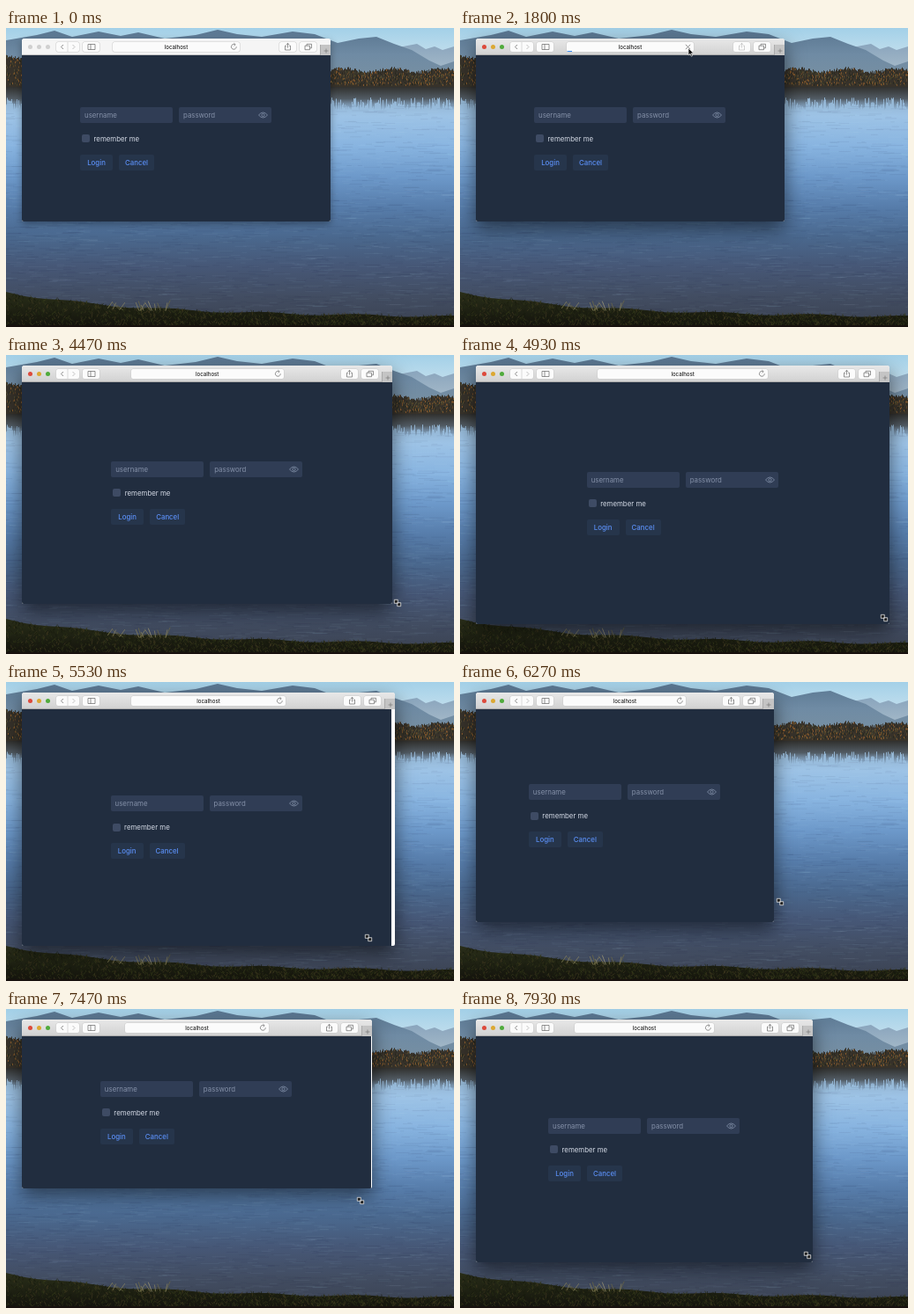
These frames come from a looping animation (508x340 px, 8000 ms). An HTML page with a canvas:

```html
<!DOCTYPE html>
<html lang="en">
<head>
<meta charset="utf-8">
<title>Resizing a login window</title>
<style>
  html, body { margin: 0; width: 508px; height: 340px; overflow: hidden; }
  body { position: relative; font: 7.85px/18px Inter, sans-serif; }
  canvas, svg, #win, #win div { position: absolute; box-sizing: border-box; }
  svg { overflow: visible; fill: none; stroke: #666; stroke-width: .7; }
  #win { left: 18px; top: 12px; border-radius: 3px 3px 2px 2px; overflow: hidden; background: #fff;
         box-shadow: 0 3px 9px rgba(0,0,0,.35); }
  #win.active { box-shadow: 0 8px 22px rgba(0,0,0,.55); }
  #bar { left: 0; right: 0; top: 0; height: 19px; background: #f5f5f5; border-bottom: 1px solid #c4c4c4; }
  .active #bar { background: linear-gradient(#e8e8e8, #d2d2d2); border-color: #aaa; }
  .light { top: 6.7px; width: 5.6px; height: 5.6px; border-radius: 50%; background: #d0d0d0; }
  .active .red { background: #dd4a3c; }
  .active .yellow { background: #dca833; }
  .active .green { background: #50ab3c; }
  .btn { top: 4px; height: 11px; border-radius: 2px; background: #fbfbfb; box-shadow: 0 0 0 .5px #ccc; }
  #address { left: 29.4%; width: 41.2%; overflow: hidden; text-align: center; color: #222;
             font-size: 6.1px; font-weight: 500; line-height: 11.5px; }
  #progress { left: 0; bottom: 0; height: 1px; background: #3b8cf0; }
  #newtab { right: 0; top: 6.5px; width: 12.5px; height: 12.5px; background: #c4c4c4; border-left: .5px solid #aaa; }
  #page { left: 0; top: 19px; bottom: 0; background: #212d3f; overflow: hidden; }
  #form { left: 50%; top: 50%; width: 217px; height: 72px; margin: -36px 0 0 -109px; }
  .field { top: 0; width: 105px; height: 18px; padding-left: 5px; border-radius: 2px;
           background: #303d55; color: #8490a8; }
  .check { left: 2px; top: 31.5px; width: 9px; height: 9px; border-radius: 2px; background: #3e4b64; }
  .label { left: 15.5px; top: 27px; color: #d3d9e5; white-space: nowrap; }
  .action { top: 54px; height: 18px; border-radius: 2px; background: #26354b; color: #5b8ff5;
            font-weight: 500; text-align: center; }
  #scroll { right: 0; top: 0; bottom: 0; width: 6px; background: #171d28; }
  #scroll div { left: 1px; top: 1px; width: 4px; height: 84%; border-radius: 2px; background: #878b92; }
</style>
</head>
<body>
<canvas id="lake" width="508" height="340"></canvas>
<div id="win">
  <div id="page">
    <div id="form">
      <div class="field" style="left:0">username</div>
      <div class="field" style="left:112px">password
        <svg style="left:90px;top:4px;stroke:#8f9cb5" width="11" height="10"><path d="M.5 5Q5.5-1 10.5 5Q5.5 11 .5 5Z"/><circle cx="5.5" cy="5" r="1.6"/></svg>
      </div>
      <div class="check"></div>
      <div class="label">remember me</div>
      <div class="action" style="left:0;width:37px">Login</div>
      <div class="action" style="left:44px;width:40px">Cancel</div>
    </div>
    <div id="scroll"><div></div></div>
  </div>
  <div id="bar">
    <div class="light red" style="left:6.7px"></div>
    <div class="light yellow" style="left:16.7px"></div>
    <div class="light green" style="left:26.7px"></div>
    <div class="btn" style="left:39px;width:26px">
      <svg width="26" height="11"><path d="M8 3L5.5 5.5L8 8"/><path d="M13 0V11" stroke="#ccc"/><path d="M18.5 3L21 5.5L18.5 8" stroke="#aaa"/></svg>
    </div>
    <div class="btn" style="left:69px;width:19px">
      <svg width="19" height="11"><path d="M6 2.5H14V8.5H6ZM9 2.5V8.5"/></svg>
    </div>
    <div class="btn" id="address">localhost
      <svg style="right:1px;top:0" width="11" height="11">
        <path id="reload" d="M6.5 2.7A2.9 2.9 0 1 0 8.2 5.2M5.5 1.2L7.2 2.8L5.5 4.2"/>
        <path id="stop" d="M2.8 2.8L8.2 8.2M8.2 2.8L2.8 8.2"/>
      </svg>
      <div id="progress"></div>
    </div>
    <div class="btn" style="right:39px;width:19px">
      <svg id="share" width="19" height="11"><path d="M8 4.2H6.5V9H12.5V4.2H11M9.5 6.5V1.5M7.8 3L9.5 1.3L11.2 3"/></svg>
    </div>
    <div class="btn" style="right:16px;width:19px">
      <svg width="19" height="11"><path d="M6 4.2H11.5V8.7H6ZM8 4V2.3H13.5V6.8H11.7"/></svg>
    </div>
    <div id="newtab"><svg width="12" height="13"><path d="M3.5 7H8.5M6 4.5V9.5" stroke="#777"/></svg></div>
  </div>
</div>
<svg id="arrow" width="9" height="11"><path d="M0 0V8L2 6.3L3.3 9.2L4.6 8.6L3.3 5.8H5.8Z" fill="#111" stroke="#e8e8e8"/></svg>
<svg id="grip" width="1" height="1"><path d="M-3.7-3.7H.3V.3H-3.7ZM-.3-.3H3.7V3.7H-.3Z" fill="#222" stroke="#e4e4e4" stroke-width=".8"/></svg>

<script>
const $ = id => document.getElementById(id);
const DURATION = 8000, STEP = 1000 / 15;

// time, right edge and bottom edge of the window
const CORNER = [
  [4130, 368, 220], [4470, 439, 283], [4800, 483, 304], [5230, 485, 306], [5530, 442, 300],
  [5720, 372, 299], [5930, 330, 300], [6130, 334, 298], [6500, 400, 220], [6870, 457, 135],
  [7070, 453, 120], [7250, 438, 135], [7550, 408, 230], [7800, 399, 285], [7930, 400, 288]
];
// time and tip of the arrow
const POINTER = [
  [400, 341, 308], [530, 250, 98], [800, 250, 98], [1200, 255, 20], [1530, 259, 23],
  [2800, 259, 23], [3200, 359, 205], [3400, 359, 209]
];

// smooth curve through timed points, at rest on both ends
function along(keys, t) {
  const last = keys.length - 1;
  if (t <= keys[0][0]) return keys[0].slice(1);
  if (t >= keys[last][0]) return keys[last].slice(1);
  const i = keys.findIndex(k => k[0] > t) - 1;
  const a = keys[i], b = keys[i + 1], span = b[0] - a[0], u = (t - a[0]) / span;
  const slope = (j, c) => {
    if (j === 0 || j === last) return 0;
    const before = keys[j][c] - keys[j - 1][c], after = keys[j + 1][c] - keys[j][c];
    return before * after <= 0 ? 0 : (before + after) / (keys[j + 1][0] - keys[j - 1][0]);
  };
  return [1, 2].map(c =>
    a[c] + (b[c] - a[c]) * u * u * (3 - 2 * u) +
    span * u * (1 - u) * ((1 - u) * slope(i, c) - u * slope(i + 1, c)));
}

function place(el, [x, y], visible) {
  el.style.left = x + 'px';
  el.style.top = y + 'px';
  el.style.display = visible ? '' : 'none';
}

function draw(t) {
  const [right, bottom] = along(CORNER, t), width = right - 18;
  const loading = t >= 1730 && t < 2500;
  $('win').className = t >= 1730 ? 'active' : '';
  $('win').style.width = width + 'px';
  $('win').style.height = bottom - 12 + 'px';
  $('page').style.width = Math.min(width, along(CORNER, t + 15)[0] - 18) + 'px';
  $('scroll').style.display = bottom < 128 ? '' : 'none';
  $('reload').style.display = loading ? 'none' : '';
  $('stop').style.display = loading ? '' : 'none';
  $('share').style.opacity = loading ? .4 : 1;
  $('progress').style.width = loading ? 4 + 96 * ((t - 1800) / 700) ** 2 + '%' : 0;
  place($('arrow'), along(POINTER, t), t >= 399 && t < 3660);
  const [x, y] = along(CORNER, t + 70);
  place($('grip'), [x - 6.5, y - 8], t >= 3660);
}

function paintLake() {
  const g = $('lake').getContext('2d');
  let seed = 7;
  const random = () => (seed = seed * 16807 % 2147483647) / 2147483647;
  const between = (a, b) => a + (b - a) * random();
  const pick = list => list[Math.floor(random() * list.length)];
  const gradient = (top, bottom, ...colors) => {
    const fill = g.createLinearGradient(0, top, 0, bottom);
    colors.forEach((c, i) => fill.addColorStop(i / (colors.length - 1), c));
    return fill;
  };
  const rect = (fill, x, y, w, h) => { g.fillStyle = fill; g.fillRect(x, y, w, h); };
  const ridge = (fill, base, points) => {
    g.fillStyle = fill;
    g.beginPath();
    g.moveTo(points[0][0], base);
    points.forEach(p => g.lineTo(...p));
    g.lineTo(508, base);
    g.fill();
  };

  rect(gradient(0, 50, '#a3d0e8', '#bcdcec', '#c6d9e4'), 0, 0, 508, 68);
  ridge(gradient(18, 46, '#8aa5bd', '#a3b8c8'), 60,
    [[425, 30], [445, 22], [466, 18], [476, 24], [486, 21], [495, 25], [508, 21]]);
  ridge(gradient(0, 60, '#587590', '#6f8ba4', '#7890a2'), 66, [
    [0, 14], [35, 8], [55, 3], [75, 10], [105, 4], [130, 9], [150, 5], [180, 12], [215, 8],
    [240, 2], [262, 7], [290, 10], [325, 4], [350, 7], [376, 17], [400, 12], [420, 10],
    [440, 18], [460, 25], [480, 37], [493, 43], [508, 38]]);

  rect(gradient(66, 340, '#8ba8c0', '#9dc3e6', '#88b4e0', '#6d99ca', '#577dab', '#4a688e', '#465776', '#424d62', '#3a4150'),
    0, 66, 508, 274);
  // fine ripples
  for (let i = 0; i < 2500; i++) {
    const y = between(82, 325);
    rect(random() < .5 ? 'rgba(200,220,240,.05)' : 'rgba(20,30,55,.06)', between(-20, 508), y, between(4, 22), 1);
  }
  // autumn trees and their reflection
  for (let x = 0; x < 508; x++) {
    const top = 48 + 2 * Math.sin(x / 9) + between(-2, 2) - (x < 18 ? 16 : 0);
    rect('#37322a', x, top, 1, 67 - top);
    rect(gradient(67, 94, 'rgba(44,42,38,.95)', 'rgba(60,62,64,.75)', 'rgba(90,110,135,0)'),
      x, 67, 1, between(12, 27));
    for (let i = 0; i < 4; i++)
      rect(pick(['#5a4528', '#74502b', '#45412a', '#26281e', '#875a2e', '#4f4a32', '#2e2b22']), x, between(top, 64), 1.5, 2);
  }

  // grassy bank
  const bank = x => 300 + 24 * (1 - Math.exp(-x / 130)) + x / 110 + 1.2 * Math.sin(x / 17);
  g.fillStyle = gradient(298, 340, '#2b2f1a', '#1f2213', '#13120c');
  g.beginPath();
  g.moveTo(0, 340);
  for (let x = 0; x <= 508; x += 4) g.lineTo(x, bank(x));
  g.lineTo(508, 340);
  g.fill();
  const blade = (color, x, y, dx, dy) => {
    g.strokeStyle = color;
    g.beginPath();
    g.moveTo(x, y);
    g.lineTo(x + dx, y - dy);
    g.stroke();
  };
  g.lineWidth = .7;
  for (let i = 0; i < 2200; i++) {
    const x = between(0, 508), y = between(bank(x) + 1, 340);
    blade(pick(['#34391a', '#262c15', '#171a0d', '#403920', '#1c1f10']), x, y, between(-3, 3), between(1, 4));
  }
  for (let i = 0; i < 16; i++) {
    const x = between(115, 185);
    blade(pick(['#8e8761', '#6f6a45', '#a69f7c']), x, bank(x) + 3, between(-9, 7), between(3, 12));
  }
  rect('#17100d', 0, 338, 508, 2);
}

paintLake();
const start = performance.now();
(function tick() {
  const t = (performance.now() - start) % DURATION;
  draw(Math.floor((t + 4) / STEP) * STEP);
  requestAnimationFrame(tick);
})();
</script>
</body>
</html>
```
